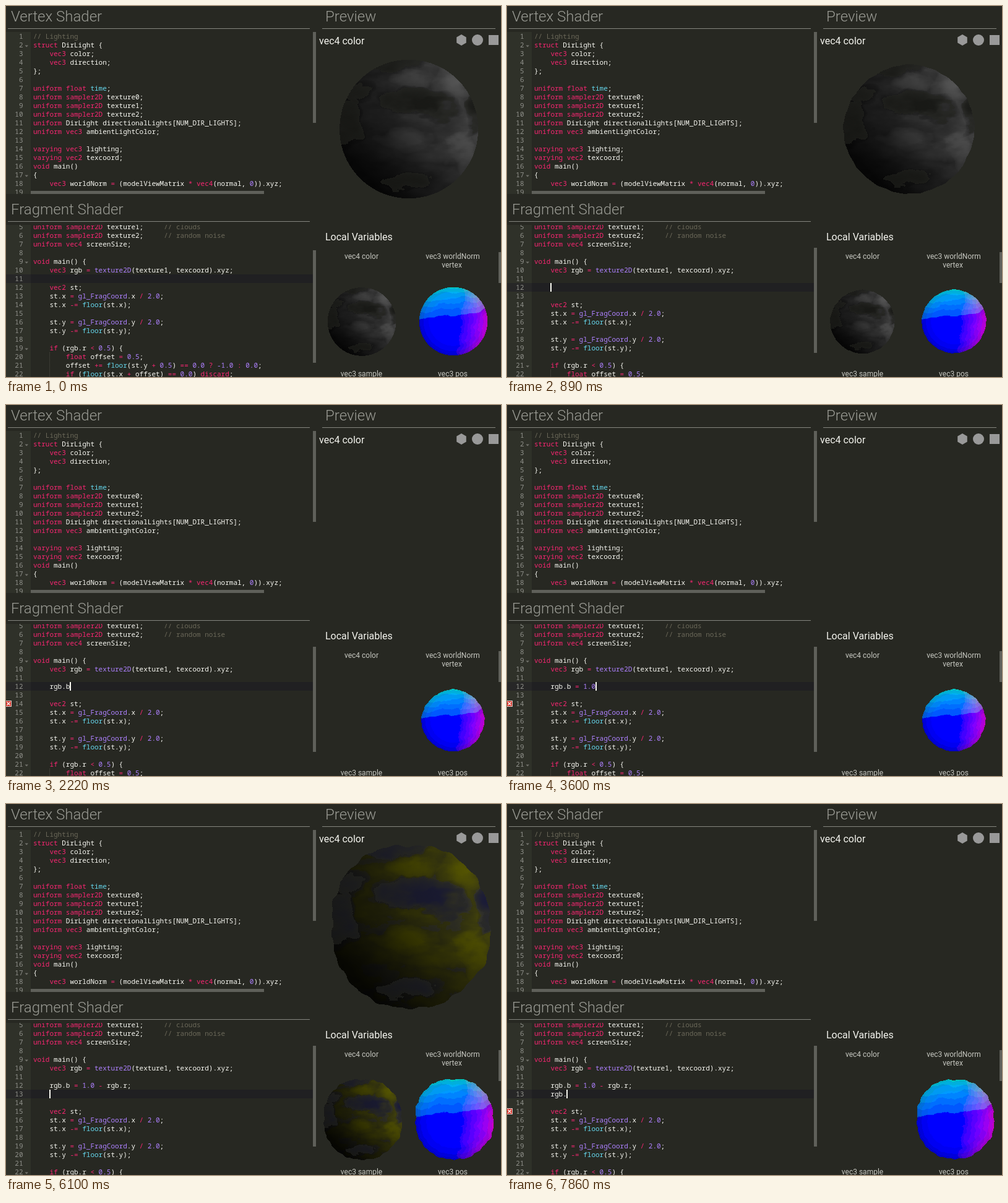
These frames come from a looping animation (800 by 600 pixels, 8 s). An HTML page with a canvas:

```html
<!DOCTYPE html>
<html lang="en">
<head>
<meta charset="utf-8">
<title>Shader editor</title>
<style>
html, body { margin: 0; width: 100%; height: 100%; overflow: hidden; background: #272822; }
canvas { display: block; }
</style>
</head>
<body>
<canvas id="stage" width="800" height="600"></canvas>
<script>
const LOOP = 8000, CHAR = 6.6, ROW = 14, LEFT = 44;
const ctx = document.getElementById('stage').getContext('2d');
const C = { bg: '#272822', gutter: '#2f3129', num: '#8f908a', text: '#f8f8f2', key: '#f92672',
  val: '#ae81ff', fn: '#66d9ef', note: '#6b6859', bar: '#5f605a', title: '#9a9b94' };

const vertexCode = `// Lighting
struct DirLight {
    vec3 color;
    vec3 direction;
};

uniform float time;
uniform sampler2D texture0;
uniform sampler2D texture1;
uniform sampler2D texture2;
uniform DirLight directionalLights[NUM_DIR_LIGHTS];
uniform vec3 ambientLightColor;

varying vec3 lighting;
varying vec2 texcoord;
void main()
{
    vec3 worldNorm = (modelViewMatrix * vec4(normal, 0)).xyz;
`.split('\n');

const fragHead = `uniform sampler2D texture1;     // clouds
uniform sampler2D texture2;     // random noise
uniform vec4 screenSize;

void main() {
    vec3 rgb = texture2D(texture1, texcoord).xyz;
`.split('\n');

const fragTail = `    vec2 st;
    st.x = gl_FragCoord.x / 2.0;
    st.x -= floor(st.x);

    st.y = gl_FragCoord.y / 2.0;
    st.y -= floor(st.y);

    if (rgb.r < 0.5) {
        float offset = 0.5;
        offset += floor(st.y + 0.5) == 0.0 ? -1.0 : 0.0;
        if (floor(st.x + offset) == 0.0) discard;`.split('\n');

// Keystrokes: time and character
const first = 'rgb.b = 1.0 - rgb.r;', second = 'rgb.';
const firstTimes = [1180, 1390, 1610, 1930, 2170, 2450, 2730, 2830, 3110, 3370,
  3600, 3750, 3980, 4160, 4260, 4440, 4670, 4900, 5180, 5510];
const secondTimes = [6300, 6500, 6710, 6950];
const ENTER1 = 300, ENTER2 = 480, UP = 680, ENTER3 = 5970;
const FAIL1 = 2220, FIXED = 5870, FAIL2 = 7220;
const keyTimes = [ENTER1, ENTER2, UP, ...firstTimes, ENTER3, ...secondTimes];

const typed = (text, times, t) => text.slice(0, times.filter(k => k <= t).length);

function rect(x, y, w, h, color) {
  ctx.fillStyle = color;
  ctx.fillRect(x, y, w, h);
}

function label(text, x, y, size, color, weight = 400, align = 'left') {
  ctx.font = `${weight} ${size}px Roboto, sans-serif`;
  ctx.textAlign = align;
  ctx.fillStyle = color;
  ctx.fillText(text, x, y);
}

function clipped(x, y, w, h, draw) {
  ctx.save();
  ctx.beginPath();
  ctx.rect(x, y, w, h);
  ctx.clip();
  draw();
  ctx.restore();
}

const tokenRule = /\/\/.*|-?\d+\.?\d*|\w+|[-=*\/<+?:]+|\s+|./g;
function tokenColor(s) {
  if (s.startsWith('//')) return C.note;
  if (/^-?\d/.test(s) || /^(gl_FragCoord|texture2D)$/.test(s)) return C.val;
  if (/^(struct|uniform|varying|void|vec[234]|float|sampler2D|if|discard)$/.test(s)) return C.key;
  if (/^(floor|time)$/.test(s)) return C.fn;
  return /^[-=*\/<+?:]+$/.test(s) ? C.key : C.text;
}

function codeLine(text, number, top) {
  const base = top + 11;
  ctx.font = '11px "Noto Sans Mono", "DejaVu Sans Mono", monospace';
  ctx.textAlign = 'right';
  ctx.fillStyle = C.num;
  ctx.fillText(number, 27.5, base);
  ctx.textAlign = 'left';
  for (const m of text.matchAll(tokenRule)) {
    if (!m[0].trim()) continue;
    ctx.fillStyle = tokenColor(m[0]);
    ctx.fillText(m[0], LEFT + m.index * CHAR, base);
  }
  if (text.startsWith('        ')) {
    for (let y = 0; y < ROW; y += 2) rect(70, top + y, 1, 1, '#4b4b43');
  }
  if (/\{$/.test(text)) {
    ctx.fillStyle = '#72736c';
    ctx.beginPath();
    ctx.moveTo(30.5, top + 20 - 0.5 - ROW + 14 - 12);
    ctx.lineTo(36, top + 7.5);
    ctx.lineTo(33.2, top + 10.5);
    ctx.lineTo(30.5, top + 7.5);
    ctx.fill();
  }
}

function errorMark(y) {
  rect(0, y - 5, 9, 10, '#e9d5d2');
  rect(0, y - 4, 8, 8, '#cf2a20');
  ctx.strokeStyle = '#fff';
  ctx.lineWidth = 1.5;
  ctx.beginPath();
  ctx.moveTo(1.5, y - 2.5); ctx.lineTo(6.5, y + 2.5);
  ctx.moveTo(6.5, y - 2.5); ctx.lineTo(1.5, y + 2.5);
  ctx.stroke();
}

function vertexEditor() {
  rect(0, 42, 40, 262, C.gutter);
  clipped(0, 42, 496, 262, () => vertexCode.forEach((s, i) => codeLine(s, i + 1, 42 + i * ROW)));
  rect(40, 298, 456, 6, C.bg);
  rect(40, 299, 377, 5, C.bar);
  rect(496, 42, 5, 147, C.bar);
}

function fragmentEditor(t) {
  const added = [ENTER1, ENTER2, ENTER3].filter(k => t >= k).length;
  const lineA = typed(first, firstTimes, t), lineB = typed(second, secondTimes, t);
  const pad = s => s ? '    ' + s : '';
  const middle = [[], [''], [pad(lineA), ''], [pad(lineA), pad(lineB), '']][added];
  const lines = [...fragHead, ...middle, ...fragTail];
  const row = t < ENTER1 ? 11 : t < ENTER2 ? 12 : t < UP ? 13 : t < ENTER3 ? 12 : 13;
  const top = n => 350 + (n - 5) * ROW;

  rect(0, 354, 40, 246, C.gutter);
  rect(0, top(row), 40, ROW, '#272727');
  rect(40, top(row), 456, ROW, '#202022');
  clipped(0, 354, 496, 246, () => lines.slice(0, 18).forEach((s, i) => codeLine(s, i + 5, top(i + 5))));

  const last = keyTimes.filter(k => k <= t).pop();
  if (last !== undefined && (t - last) % 910 < 500) {
    const col = 4 + (added === 3 ? lineB : lineA).length;
    rect(Math.floor(LEFT + col * CHAR), top(row), 2, ROW, '#f8f8f0');
  }
  if (t >= FAIL1 && t < FIXED && !(t >= 2730 && t < 2780)) errorMark(483);
  if (t >= FAIL2) errorMark(497);

  const y0 = [395, 393, 391, 391][added], y1 = [577, 569, 561, 554][added];
  rect(496, y0, 5, y1 - y0, C.bar);
}

function frameParts() {
  label('Vertex Shader', 8, 25, 24, C.title, 300);
  label('Fragment Shader', 8, 337, 24, C.title, 300);
  label('Preview', 516, 25, 24, C.title, 300);
  rect(3, 36, 488, 1, '#85867f');
  rect(3, 348, 488, 1, '#85867f');
  rect(511, 36, 280, 1, '#85867f');
  rect(796, 398, 4, 50, C.bar);
}

function previewLabels() {
  label('vec4 color', 506, 62, 16, '#f4f4ee');
  label('Local Variables', 516, 379, 16, '#f4f4ee');
  const small = (s, x, y) => label(s, x, y, 12, '#c6c7c0', 400, 'center');
  small('vec4 color', 574.5, 409);
  small('vec3 worldNorm', 722, 409);
  small('vertex', 720.5, 423);
  small('vec3 sample', 574.5, 599);
  small('vec3 pos', 722, 599);

  ctx.fillStyle = '#999';
  ctx.beginPath();
  for (let i = 0; i < 6; i++) {
    const a = Math.PI * (i / 3 + 1 / 6);
    ctx.lineTo(736 + 9 * Math.cos(a), 55 + 9 * Math.sin(a));
  }
  ctx.fill();
  ctx.beginPath();
  ctx.arc(762, 55, 9, 0, Math.PI * 2);
  ctx.fill();
  rect(780, 47, 16, 16, '#999');
}

// Cloud texture over the visible disc
const clamp = (x, lo, hi) => Math.min(hi, Math.max(lo, x));
const hash = (x, y) => {
  const h = Math.sin(x * 127.1 + y * 311.7) * 43758.5453;
  return h - Math.floor(h);
};
function noise(x, y) {
  const i = Math.floor(x), j = Math.floor(y);
  const ease = f => f * f * (3 - 2 * f);
  const a = ease(x - i), b = ease(y - j);
  const mix = (p, q, k) => p + (q - p) * k;
  return mix(mix(hash(i, j), hash(i + 1, j), a), mix(hash(i, j + 1), hash(i + 1, j + 1), a), b);
}
function fbm(x, y) {
  let sum = 0, amp = 0.5;
  for (let k = 0; k < 4; k++, amp /= 2) {
    sum += amp * noise(x, y);
    x = x * 2 + 7.3; y = y * 2 + 3.1;
  }
  return sum / 0.9375;
}

// x, y, width, height, weight
const blobs = [
  [0.08, -0.4, 0.52, 0.22, -0.45], [0.38, -0.28, 0.34, 0.2, -0.35], [-0.88, -0.05, 0.26, 0.42, -0.4],
  [-0.68, -0.52, 0.22, 0.18, -0.3], [0.02, 0.76, 0.38, 0.15, -0.4], [-0.1, -0.95, 0.5, 0.1, -0.3],
  [0.92, -0.25, 0.16, 0.4, -0.35], [0.02, -0.72, 0.4, 0.14, 0.25], [-0.05, 0.13, 0.45, 0.18, 0.25],
  [0.3, 0.34, 0.5, 0.16, 0.18], [0.8, 0.35, 0.22, 0.35, 0.25], [0.62, -0.68, 0.25, 0.25, 0.2]
];
const N = 256, cloud = new Float32Array(N * N), grain = new Float32Array(N * N);
for (let j = 0; j < N; j++) for (let i = 0; i < N; i++) {
  const u = i / N * 2 - 1, v = j / N * 2 - 1;
  const rough = fbm(u * 3.2 + 11, v * 6 + 5);
  const wu = u + 0.22 * (noise(u * 6 + 3, v * 8) - 0.5), wv = v + 0.18 * (rough - 0.5);
  let c = 0.64 + 0.42 * (rough - 0.5);
  for (const [x, y, w, h, k] of blobs) {
    const d = ((wu - x) / w) ** 2 + ((wv - y) / h) ** 2;
    if (d < 1) c += k * (1 - d) ** 0.7;
  }
  cloud[j * N + i] = clamp(c, 0.15, 0.95);
  grain[j * N + i] = rough - 0.5;
}

// Paint functions return false where the pixel is discarded
const px = [0, 0, 0];
function paintColor(u, v, k, odd, tinted) {
  const c = cloud[k];
  if (c < 0.5 && odd) return false;
  const light = Math.max(10, 56 + 36 * u - 10 * v - 26 * Math.max(0, v));
  px[0] = px[1] = c * light;
  px[2] = (tinted ? 1 - c : c) * light;
  if (tinted && c > 0.6) px[2] *= 0.5;
  return true;
}
function paintNormal(u, v, k) {
  const w = grain[k] * 0.22;
  const z = Math.sqrt(Math.max(0, 1 - u * u - v * v));
  const band = x => Math.round(x / 22) * 22;
  const up = -v - 0.1 * u + w - 0.2, side = u + 0.12 * v + w - 0.24;
  px[0] = side > 0 ? band(40 + 190 * side) : 0;
  px[1] = up > 0 ? band(75 + 140 * up) : 0;
  px[2] = band(255 * Math.min(1, 0.7 + 0.42 * z));
  return true;
}

// Outline swelling every 22.5 degrees, clockwise from the right
const bumps = [20, 25, 21, 23, 20, 21, 19, 16, 12, 18, 22, 24, 20, 25, 24, 22];
function bump(angle) {
  const p = (angle / (2 * Math.PI) + 1) % 1 * 16;
  const i = Math.floor(p), f = (1 - Math.cos((p - i) * Math.PI)) / 2;
  const ripple = 1.2 * Math.sin(angle * 17) + Math.sin(angle * 29 + 1);
  return bumps[i % 16] * (1 - f) + bumps[(i + 1) % 16] * f + ripple;
}
const swellTable = Float32Array.from({ length: 720 }, (_, i) => bump(i * Math.PI / 360));

const layer = document.createElement('canvas');
layer.width = layer.height = 300;
const lctx = layer.getContext('2d');

function ball(cx, cy, scale, swell, paint, tinted) {
  const size = Math.ceil(300 * scale), half = size / 2;
  const x0 = Math.round(cx - half), y0 = Math.round(cy - half);
  const img = lctx.createImageData(size, size), out = img.data;
  for (let y = 0; y < size; y++) for (let x = 0; x < size; x++) {
    const dx = x0 + x + 0.5 - cx, dy = y0 + y + 0.5 - cy;
    const a = Math.floor((Math.atan2(dy, dx) / Math.PI * 360 + 720) % 720);
    const r = (111.5 + swell * swellTable[a]) * scale;
    const u = dx / r, v = dy / r;
    if (u * u + v * v >= 1) continue;
    const k = Math.floor((v + 1) * N / 2) * N + Math.floor((u + 1) * N / 2);
    if (!paint(u, v, k, (x0 + x + y0 + y) & 1, tinted)) continue;
    const o = (y * size + x) * 4;
    out[o] = px[0]; out[o + 1] = px[1]; out[o + 2] = px[2]; out[o + 3] = 255;
  }
  lctx.clearRect(0, 0, 300, 300);
  lctx.putImageData(img, 0, 0);
  ctx.drawImage(layer, 0, 0, size, size, x0, y0, size, size);
}

function swellAt(t) {
  const radius = 116.5 - 14.5 * Math.cos(Math.PI * (t - 1850) / 4600);
  return (radius - 111.5) / 19.5;
}

function preview(t) {
  const broken = (t >= FAIL1 && t < FIXED) || t >= FAIL2;
  const shown = t < FIXED ? Math.min(t, FAIL1) : Math.min(t, FAIL2);
  const swell = swellAt(shown), tinted = t >= FIXED;
  if (!broken) {
    ball(651, 199, 1, swell, paintColor, tinted);
    ball(575, 510.5, 0.493, swell, paintColor, tinted);
  }
  ball(723, 510, 0.493, swell, paintNormal);
}

function draw(t) {
  rect(0, 0, 800, 600, C.bg);
  frameParts();
  vertexEditor();
  fragmentEditor(t);
  preview(t);
  previewLabels();
}

let start;
function tick(now) {
  start ??= now;
  draw((now - start) % LOOP);
  requestAnimationFrame(tick);
}
requestAnimationFrame(tick);
</script>
</body>
</html>
```
